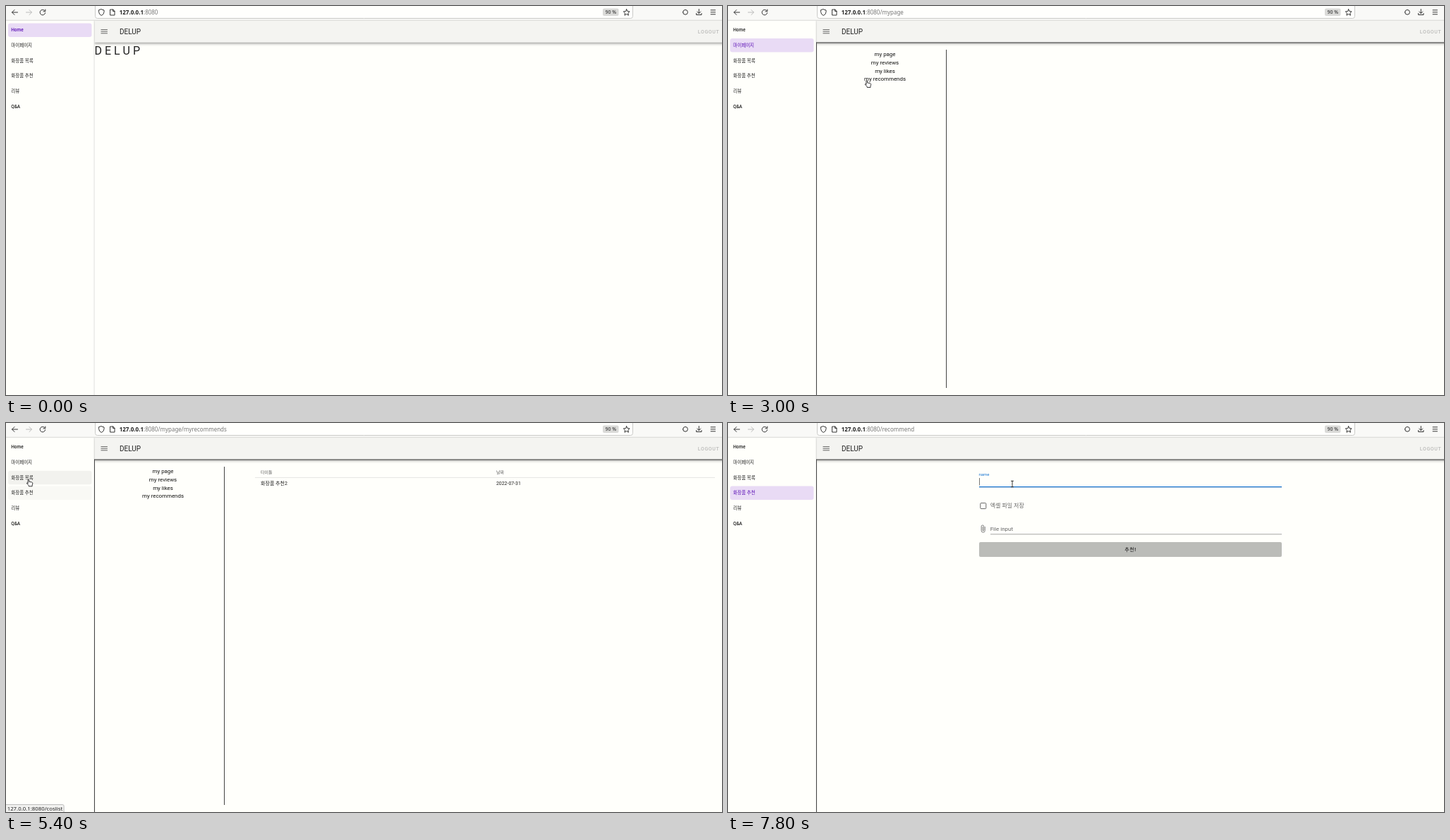
Animation of 1015x552 px, one loop 8 s. Source, as an HTML page with a canvas:

```html
<!DOCTYPE html>
<html lang="ko">
<head>
<meta charset="utf-8">
<title>Cosmetics page</title>
<style>
html, body { margin: 0; height: 100%; overflow: hidden; background: #fffffb; }
canvas { display: block; }
</style>
</head>
<body>
<canvas id="stage" width="1015" height="552"></canvas>
<script>
const ctx = document.getElementById('stage').getContext('2d');
const LOOP = 8000;
const UI = "Roboto, 'Noto Sans CJK KR', 'Noto Sans CJK JP', sans-serif";
const CHROME = "'Noto Sans', sans-serif";
const BRAND = 'DELUP';
const INK = '#222', GREY = '#666', BLUE = '#1976d2', PURPLE = '#5b0fb5';

const ITEMS = ['Home', '마이페이지', '화장품 목록', '화장품 추천', '리뷰', 'Q&A'];
const ROUTES = ['/', '/mypage', '/coslist', '/recommend', '/review', '/qna'];
const ROW = 21.7, SIDEBAR = 125;

// When each page opens, its path and the sidebar item it highlights
const PAGES = [
  { at: 0, path: '', item: 0 },
  { at: 1500, path: '/mypage', item: 1 },
  { at: 3100, path: '/mypage/myrecommends', item: -1 },
  { at: 6800, path: '/recommend', item: 3 },
];
const CLICKS = [{ at: 1300, item: 1 }, { at: 6600, item: 3 }];
const FOCUS = 7500;

// Pointer path: time, x, y
const POINTER = [
  [800, 300, 200], [1200, 31.5, 55.5], [1600, 31.5, 55.5], [2100, 181, 98],
  [2250, 181, 98], [2400, 188, 109], [2650, 188, 109], [2800, 198.5, 110.5],
  [3050, 198.5, 110.5], [3300, 209, 110.5], [3400, 209, 110.5], [3600, 410, 139],
  [3700, 410, 139], [3800, 437, 90], [3950, 437, 90], [4300, 420, 149],
  [4600, 246.5, 146.5], [4700, 35, 105], [4850, 33, 98], [5000, 33, 66],
  [5150, 33, 66], [5550, 34, 96], [5900, 36, 60], [6050, 36, 60],
  [6300, 37.5, 68], [6600, 34.5, 106], [7000, 34.5, 106], [7400, 403, 86.5],
];

const clamp = v => Math.max(0, Math.min(1, v));
const mix = (a, b, p) => a + (b - a) * p;
const ramp = (t, from, length) => clamp((t - from) / length);
const ease = p => p * p * (3 - 2 * p);

function pointerAt(t) {
  const next = POINTER.findIndex(key => key[0] > t);
  if (next < 0) return POINTER[POINTER.length - 1].slice(1);
  if (next === 0) return [900, 400];
  const a = POINTER[next - 1], b = POINTER[next];
  const p = (t - a[0]) / (b[0] - a[0]);
  return [mix(a[1], b[1], p), mix(a[2], b[2], p)];
}

function hoveredAt(t) {
  const [x, y] = pointerAt(t);
  const item = Math.floor((y - 23.5) / ROW);
  return x < SIDEBAR && item < ITEMS.length ? item : -1;
}

// Share of a 200 ms window spent over the item gives a soft fade
function hoverLevel(item, t) {
  let hits = 0;
  for (let dt = -80; dt <= 100; dt += 20) hits += hoveredAt(t + dt) === item;
  return hits / 10;
}

function activeLevel(item, t) {
  let level = 0;
  PAGES.forEach(page => level = mix(level, +(page.item === item), page.at ? ramp(t, page.at, 200) : 1));
  return level;
}

function text(str, x, y, size, { color = INK, weight = 400, family = UI, align = 'left', spacing = 0 } = {}) {
  ctx.font = `${weight} ${size}px ${family}`;
  ctx.letterSpacing = spacing + 'px';
  ctx.textAlign = align;
  ctx.fillStyle = color;
  ctx.fillText(str, x, y + size * 0.355);
  return ctx.measureText(str).width;
}

function box(x, y, w, h, fill, radius = 0, stroke) {
  ctx.beginPath();
  ctx.roundRect(x, y, w, h, radius);
  if (fill) { ctx.fillStyle = fill; ctx.fill(); }
  if (stroke) { ctx.strokeStyle = stroke; ctx.lineWidth = 1; ctx.stroke(); }
}

function icon(x, y, d, color = '#333', width = 1, fill) {
  const path = new Path2D(d);
  ctx.save();
  ctx.translate(x, y);
  ctx.lineCap = ctx.lineJoin = 'round';
  if (fill) { ctx.fillStyle = fill; ctx.fill(path); }
  ctx.strokeStyle = color;
  ctx.lineWidth = width;
  ctx.stroke(path);
  ctx.restore();
}

function drawBrowser(page) {
  box(0, 0, 1015, 20, '#f9f9f7');
  box(0, 19.8, 1015, 0.9, '#d8d8d6');
  box(126.5, -4, 762, 21.5, '#fffffd', 3, '#c9c9c7');
  icon(12.5, 9, 'M4 0H-4M-.5 -3.5L-4 0L-.5 3.5');
  icon(32.5, 9, 'M-4 0H4M.5 -3.5L4 0L.5 3.5', '#bbb');
  icon(52, 9, 'M3.7 .8A3.8 3.8 0 1 1 2.6 -2.7M3.8 -4V-1.2H1');
  icon(135.3, 9, 'M0 -4.3L3.7 -3V-.5Q3.5 3 0 4.5Q-3.5 3 -3.7 -.5V-3Z');
  icon(151, 9, 'M-3 -4H.8L3 -1.6V4H-3ZM.6 -4V-1.5H3');
  const host = text('127.0.0.1', 160.7, 9, 8, { weight: 600, family: CHROME });
  text(':8080' + page.path, 160.7 + host, 9, 8, { color: '#777', family: CHROME });
  box(846, 3.5, 22.5, 10.5, '#dadad8', 2);
  text('90 %', 857.3, 8.8, 7, { weight: 500, family: CHROME, align: 'center' });
  icon(879.7, 9, 'M0 -4.4L1.3 -1.4L4.4 -1.1L2.1 1.1L2.8 4.2L0 2.6L-2.8 4.2L-2.1 1.1L-4.4 -1.1L-1.3 -1.4Z');
  icon(963, 8.8, 'M-3.4 0A3.4 3.4 0 1 0 3.4 0A3.4 3.4 0 1 0 -3.4 0Z');
  icon(982.3, 9, 'M0 -4.5V1.5M-2.5 -1L0 1.5L2.5 -1M-3.7 1.5V3.5H3.7V1.5');
  icon(1002.3, 8.8, 'M-3.2 -3H3.2M-3.2 0H3.2M-3.2 3H3.2');
}

function drawRipple(click, t) {
  const p = ease(ramp(t, click.at, 300));
  const fade = 1 - ramp(t, click.at + 350, 300);
  if (t < click.at || !fade) return;
  const [x, y] = pointerAt(click.at);
  ctx.save();
  ctx.beginPath();
  ctx.roundRect(3, 24.5 + click.item * ROW, 118.5, 19.5, 3);
  ctx.clip();
  ctx.globalAlpha = 0.22 * fade;
  ctx.fillStyle = activeLevel(click.item, t) > 0.5 ? PURPLE : '#111';
  ctx.beginPath();
  ctx.arc(mix(x, 62.3, p), mix(y, 34.3 + click.item * ROW, p), mix(18, 62, p), 0, 7);
  ctx.fill();
  ctx.restore();
}

function drawSidebar(t) {
  box(SIDEBAR - 0.4, 20, 0.9, 532, '#dcdcda');
  ITEMS.forEach((label, i) => {
    const y = 24.4 + i * ROW, active = activeLevel(i, t);
    box(3, y, 118.5, 19.5, `rgba(98,0,205,${0.14 * active})`, 3);
    box(3, y, 118.5, 19.5, `rgba(20,30,20,${0.08 * hoverLevel(i, t)})`, 3);
    text(label, 7.2, y + 9.6, 6.5, { weight: 500, color: active > 0.5 ? PURPLE : INK });
  });
  CLICKS.forEach(click => drawRipple(click, t));
}

function drawHeader(bordered) {
  ctx.save();
  ctx.beginPath();
  ctx.rect(SIDEBAR + 0.5, 20.7, 890, 60);
  ctx.clip();
  ctx.shadowColor = 'rgba(0,0,0,.45)';
  ctx.shadowBlur = 4;
  ctx.shadowOffsetY = 1.5;
  box(SIDEBAR, 20.7, 900, 31, '#f4f4f1');
  ctx.restore();
  if (bordered) {
    box(SIDEBAR, 51.5, 890, 1, '#444');
    box(SIDEBAR, 51.5, 1, 501, '#444');
  }
  icon(139.2, 36.2, 'M-4.3 -2.6H4.3M-4.3 0H4.3M-4.3 2.6H4.3', '#555', 0.9);
  text(BRAND, 161, 36.2, 10);
  text('LOGOUT', 980.8, 36.2, 7, { weight: 500, color: '#bcbcba', spacing: 0.62 });
}

function drawMyPage(t, withTable) {
  box(309, 62, 1, 480, '#444');
  ['my page', 'my reviews', 'my likes', 'my recommends'].forEach((label, i) =>
    text(label, 222.5, 68.2 + i * 11.75, 7.9, { align: 'center', color: '#111' }));
  if (!withTable) return;
  const hover = ramp(t, 3450, 100) * (1 - ramp(t, 3700, 100));
  box(353, 78, 652, 15.5, `rgba(0,0,0,${0.07 * hover})`);
  text('타이틀', 361, 69.8, 6, { weight: 500, color: GREY });
  text('날짜', 695, 69.8, 6, { weight: 500, color: GREY });
  box(353, 77, 652, 0.8, '#dfdfdc');
  text('화장품 추천2', 361, 85.6, 7);
  text('2022-07-31', 695, 85.6, 6.9);
}

function drawForm(t) {
  const focus = ease(ramp(t, FOCUS, 250));
  text('name', 355.5, mix(83, 72.8, focus), mix(8, 6, focus), { color: focus > 0 ? BLUE : GREY });
  box(356, 90.5, 429, 0.7, '#888');
  if (focus) {
    box(570.5 - 214.5 * focus, 90, 429 * focus, 1.2, BLUE);
    box(356, 78, 0.8, 10.5, '#555');
  }
  box(357.8, 113.6, 8, 8, null, 1, GREY);
  text('엑셀 파일 저장', 371.7, 117.6, 8, { color: GREY });
  icon(361.6, 150, 'M2.7 -2.5V2.5A2.5 2.7 0 0 1 -2.5 2.5V-3.2A1.8 1.8 0 0 1 1.1 -3.2V2.2A.8 .8 0 0 1 -.7 2.2V-2.5', GREY, 0.8);
  text('File input', 371.7, 150, 8, { color: GREY });
  box(372, 157.5, 413, 0.7, '#888');
  box(356, 169, 429, 21, '#bbbcb8', 2);
  text('추천!', 570.5, 179.7, 7, { weight: 500, align: 'center', spacing: 0.62, color: '#111' });
}

function drawStatus(t) {
  const item = hoveredAt(t);
  if (item < 0 || (t >= 6800 && t < 7500)) return;
  const url = '127.0.0.1:8080' + ROUTES[item];
  ctx.font = `400 7.8px ${CHROME}`;
  ctx.letterSpacing = '0px';
  box(-2, 541.5, ctx.measureText(url).width + 5.5, 14, '#f1f1ef', 2, '#bdbdbb');
  text(url, 1.7, 547, 7.8, { family: CHROME });
}

function drawPointer(t) {
  if (t < POINTER[0][0]) return;
  const [x, y] = pointerAt(t);
  if (x > 355 && t > 7000) {
    icon(x, y, 'M-1.5 -4.2H1.5M0 -4.2V4.2M-1.5 4.2H1.5', INK, 0.9);
    return;
  }
  icon(x, y, 'M-2.6 .4V-4.4Q-1.8 -5.6 -1 -4.4V-1.6L3 -.8Q4.3 -.4 4.2 1L3.5 3.2V5H-1.3V3.8L-4.3 .9Q-4.4 -.5 -2.6 .4Z', INK, 0.9, '#fff');
}

function draw(t) {
  const index = PAGES.filter(page => page.at <= t).length - 1;
  box(0, 0, 1015, 552, '#fffffb');
  drawBrowser(PAGES[index]);
  drawSidebar(t);
  drawHeader(index > 0);
  if (index === 0) text([...BRAND].join(' '), 125.5, 63.6, 16);
  else if (index === 3) drawForm(t);
  else drawMyPage(t, index === 2);
  drawStatus(t);
  drawPointer(t);
}

const start = performance.now();
function tick() {
  draw((performance.now() - start) % LOOP);
  requestAnimationFrame(tick);
}
tick();
</script>
</body>
</html>
```
